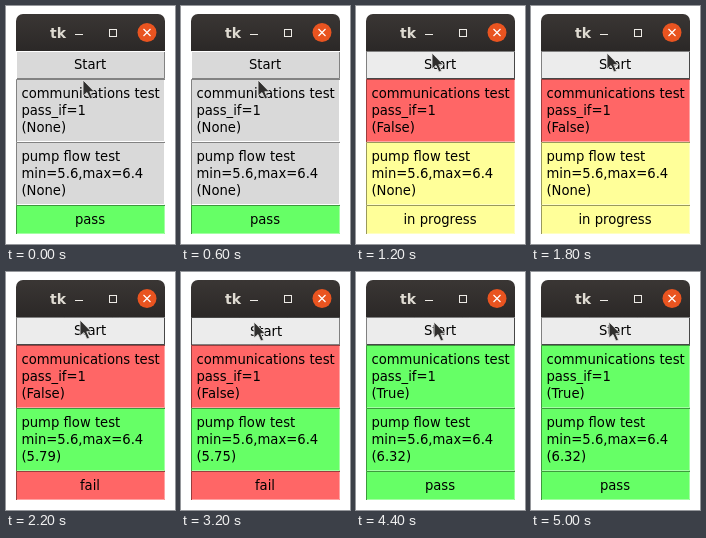
These frames come from a looping animation (169 px wide and 238 px high, 5.4 s). An HTML page:

```html
<!DOCTYPE html>
<html lang="en">
<head>
<meta charset="utf-8">
<title>Test panel</title>
<style>
  html, body { margin: 0; width: 100%; height: 100%; overflow: hidden; background: #fff; }
  svg { display: block; width: 169px; height: 238px; }
  text { font: 13.2px "DejaVu Sans", Verdana, sans-serif; fill: #000; white-space: pre; }
  .title { font-size: 14px; font-weight: bold; fill: #dfdbd2; }
  .mid { text-anchor: middle; }
</style>
</head>
<body>
<svg viewBox="0 0 169 238">
  <defs>
    <linearGradient id="bar" x2="0" y2="1">
      <stop offset="0" stop-color="#3a3634"/>
      <stop offset="1" stop-color="#2b2827"/>
    </linearGradient>
  </defs>
  <path d="M10 45V15a7 7 0 0 1 7-7H152a7 7 0 0 1 7 7V45z" fill="url(#bar)"/>
  <text class="title" x="44" y="32">tk</text>
  <g fill="none" stroke="#eeebe6">
    <path d="M69 28.5h8"/>
    <rect x="103.5" y="23.5" width="7" height="7"/>
  </g>
  <circle cx="141" cy="26.5" r="9.5" fill="#e95420"/>
  <path d="M137.5 23l7 7m0-7l-7 7" stroke="#fff" stroke-width="1.2"/>
  <g id="panel"></g>
  <path id="cursor" d="M0 0V16L4 12.6L6.9 19L9.5 17.9L6.8 11.7H11.4Z"
        fill="#302f2e" stroke="#e4e4e2" stroke-width=".9" stroke-linejoin="round"/>
</svg>
<script>
const LOOP = 5400;
const LEFT = 10, WIDTH = 149;

// Each tone: fill, shaded edge, lit edge.
const tones = {
  grey:   ['#d9d9d9', '#828282', '#fff'],
  red:    ['#ff6666', '#993d3d', '#ffa3a3'],
  green:  ['#66ff66', '#3d993d', '#a3ffa3'],
  yellow: ['#ffff99', '#99995c', '#ffffc2'],
  active: ['#ececec', '#8d8d8d', '#fff']
};

const verdictTone = { pass: 'green', fail: 'red', 'in progress': 'yellow' };

const idle = { link: ['grey', 'None'], pump: ['grey', 'None'], verdict: 'pass' };
const linkFailed = { link: ['red', 'False'], pump: ['yellow', 'None'], verdict: 'in progress' };
const failed = { link: ['red', 'False'], pump: ['green', '5.79'], verdict: 'fail' };
const failedAgain = { ...failed, pump: ['green', '5.75'] };
const linkPassed = { link: ['green', 'True'], pump: ['yellow', 'None'], verdict: 'in progress' };
const passed = { link: ['green', 'True'], pump: ['green', '6.32'], verdict: 'pass' };

const steps = [
  { at: 0,    results: idle,        button: 'plain',   cursor: [77, 74] },
  { at: 1000, results: idle,        button: 'pressed', cursor: [75, 46] },
  { at: 1200, results: linkFailed,  button: 'hover',   cursor: [76, 47] },
  { at: 2200, results: failed,      button: 'hover',   cursor: [74, 48] },
  { at: 3200, results: failedAgain, button: 'pressed', cursor: [73, 50] },
  { at: 3400, results: linkPassed,  button: 'hover',   cursor: [82, 52] },
  { at: 4400, results: passed,      button: 'hover',   cursor: [78, 50] }
];

const panel = document.getElementById('panel');
const cursor = document.getElementById('cursor');

function box(y, height, tone, raised = false) {
  const [fill, dark, light] = tones[tone];
  const [upper, lower] = raised ? [light, dark] : [dark, light];
  return `<rect x="${LEFT}" y="${y}" width="${WIDTH}" height="${height}" fill="${fill}"/>
    <path d="M${LEFT} ${y + height - .5}h${WIDTH - .5}V${y}" fill="none" stroke="${lower}"/>
    <path d="M${LEFT + .5} ${y + height}V${y + .5}h${WIDTH - .5}" fill="none" stroke="${upper}"/>`;
}

const centred = (x, y, label) => `<text class="mid" x="${x}" y="${y}">${label}</text>`;

function startButton(state) {
  const plain = state === 'plain';
  const shift = state === 'pressed' ? 1 : 0;
  const focus = `<rect x="10.5" y="45.5" width="148" height="27" fill="none"
    stroke="#000" stroke-dasharray="1 1"/>`;
  return box(45, 28, plain ? 'grey' : 'active', !shift) +
    (plain ? '' : focus) + centred(84 + shift, 63 + shift, 'Start');
}

function testBox(y, name, rule, [tone, value]) {
  const lines = [name, rule, `(${value})`];
  return box(y, 63, tone) + lines.map((line, i) =>
    `<text x="15.4" y="${y + 19 + 17 * i}">${line}</text>`).join('');
}

function draw({ results, button, cursor: [x, y] }) {
  panel.innerHTML = startButton(button) +
    testBox(73, 'communications test', 'pass_if=1', results.link) +
    testBox(136, 'pump flow test', 'min=5.6,max=6.4', results.pump) +
    box(199, 29, verdictTone[results.verdict]) +
    centred(84, 218, results.verdict);
  cursor.setAttribute('transform', `translate(${x} ${y})`);
}

let shown;
const start = performance.now();

function tick() {
  const time = (performance.now() - start) % LOOP;
  const step = steps.findLast(s => s.at <= time);
  if (step !== shown) draw(shown = step);
  requestAnimationFrame(tick);
}
tick();
</script>
</body>
</html>
```
